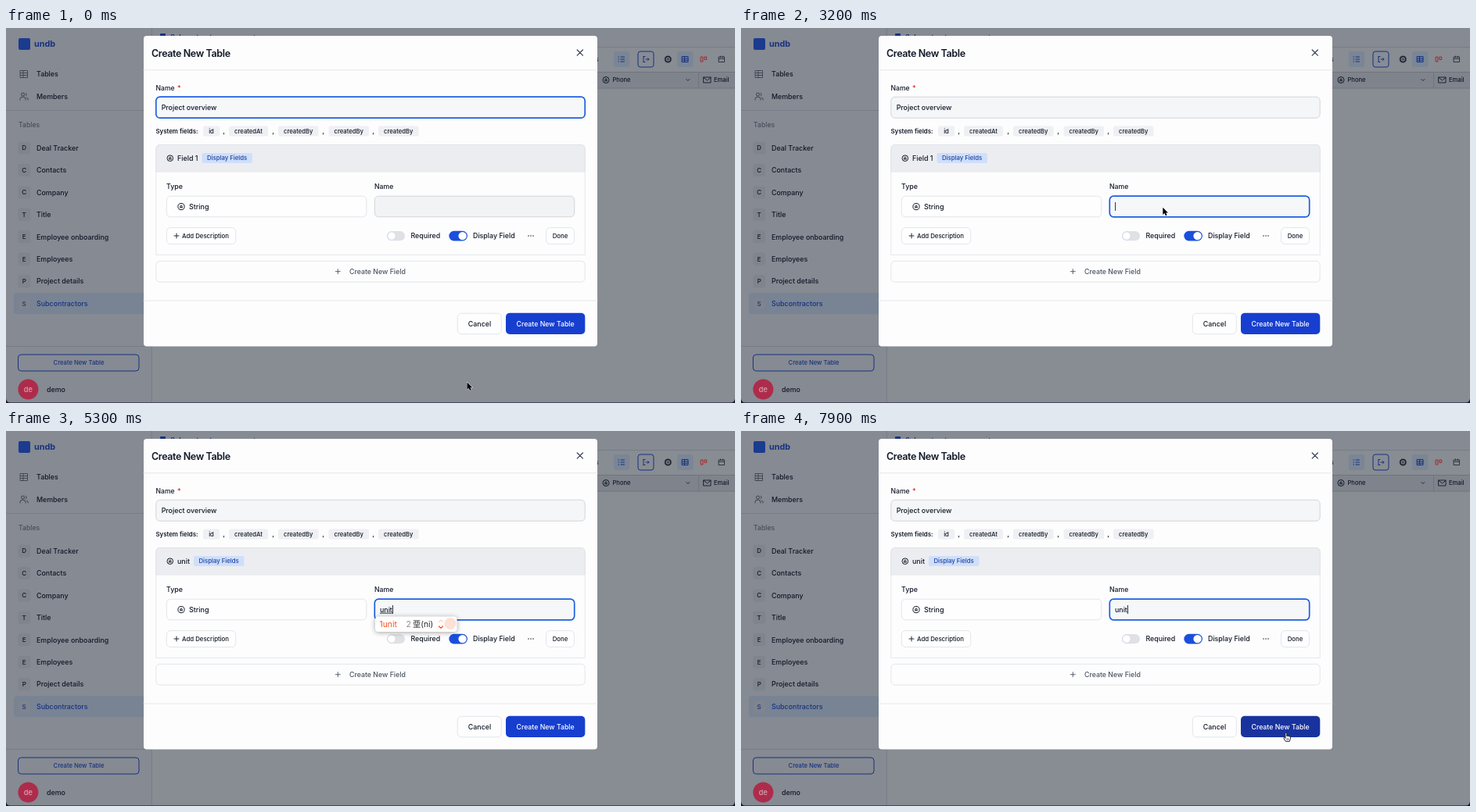
An HTML page for the animation above (8000 ms loop, 932 by 480 pixels).

```html
<!DOCTYPE html>
<html lang="en">
<head>
<meta charset="utf-8">
<title>Create New Table</title>
<style>
  html, body { margin: 0; width: 100%; height: 100%; overflow: hidden; background: #888c93; }
  svg { display: block; font-family: Inter, "Noto Sans CJK SC", "Noto Sans CJK", sans-serif; }
  text { white-space: pre; }
  .popup { filter: drop-shadow(0 1.5px 3px rgba(0, 0, 0, .35)); }
</style>
</head>
<body>
<svg id="stage" width="932" height="480" viewBox="0 0 932 480"></svg>
<script>
const LOOP = 8000;
const INK = '#111827', NAVY = '#173380', BLUE = '#1c5fe0', LINE = '#e3e5ea', ORANGE = '#f4511e';

// Drawing helpers: text is centred vertically on cy.
const text = (x, cy, str, size = 8.85, weight = 500, fill = INK, extra = '') =>
  `<text x="${x}" y="${cy + size * 0.36}" font-size="${size}" font-weight="${weight}" fill="${fill}" ${extra}>${str}</text>`;
const mid = (x, cy, str, size, weight, fill) =>
  text(x, cy, str, size, weight, fill, 'text-anchor="middle"');
const box = (x, y, w, h, r, fill, stroke = 'none', extra = '') =>
  `<rect x="${x}" y="${y}" width="${w}" height="${h}" rx="${r}" fill="${fill}" stroke="${stroke}" ${extra}/>`;
const path = (d, stroke = INK, width = 0.9, fill = 'none', extra = '') =>
  `<path d="${d}" fill="${fill}" stroke="${stroke}" stroke-width="${width}" stroke-linecap="round" stroke-linejoin="round" ${extra}/>`;
const dot = (x, y, r, fill, stroke = 'none', width = 1) =>
  `<circle cx="${x}" cy="${y}" r="${r}" fill="${fill}" stroke="${stroke}" stroke-width="${width}"/>`;
const plus = (x, y, color) => path(`M${x - 3} ${y}h6M${x} ${y - 3}v6`, color);
const letterIcon = (x, y, r = 3.8) =>
  dot(x, y, r, 'none', INK, 1) + path(`M${x - 1.1} ${y + 1.7}v-2.2a1.1 1.1 0 0 1 2.2 0v2.2m-2.2 -1h2.2`, INK, 0.9);

function sidebar() {
  const items = ['Deal Tracker', 'Contacts', 'Company', 'Title', 'Employee onboarding',
    'Employees', 'Project details', 'Subcontractors'];
  const rows = items.map((name, i) => {
    const y = 153.5 + i * 28.45, on = name === 'Subcontractors';
    return (on ? box(10, y - 13.5, 168, 27, 4, '#788394') : '')
      + box(15.5, y - 8, 15.5, 16, 3, '#7f848d')
      + mid(23.2, y, name[0], 8, 500, on ? NAVY : INK)
      + text(39, y, name, 8.9, 500, on ? NAVY : INK);
  }).join('');
  return box(0, 0, 186, 480, 0, '#868a92')
    + path('M186.3 0V480M0 105.5H186M0 407.5H186', '#777c86', 1)
    + box(16, 13, 15, 15, 2, '#1b3b8f') + text(36, 20, 'undb', 10.8, 700, NAVY)
    + path('M18.5 54.5h9v9h-9zM18.5 57.5h9M18.5 60.5h9M22 54.5v9', '#343b4a', 0.8)
    + text(39, 59, 'Tables')
    + dot(21.5, 85, 2, 'none', '#343b4a', 0.9) + path('M18 92v-1.2a3.5 2.6 0 0 1 7 0V92M25 83.2a2 2 0 0 1 0 3.6M26.4 89a2.4 2.4 0 0 1 1.8 3', '#343b4a')
    + text(39, 87.5, 'Members')
    + text(16, 123.5, 'Tables', 8.75, 400, '#3e4554')
    + rows
    + box(15.5, 418, 154.5, 21, 4, 'none', NAVY)
    + mid(93, 428.5, 'Create New Table', 7.65, 500, NAVY)
    + dot(28.4, 462.5, 13, '#ad2c4c') + mid(28.4, 462.5, 'de', 9.2, 500, '#d9a5b3')
    + text(52, 462.5, 'demo');
}

function page() {
  return box(186.8, 0, 746, 24.5, 0, '#868a92')
    + path('M187 24.5H932', '#777c86', 1)
    + box(197, 7, 7, 7, 1, NAVY) + text(210, 11.5, 'Subcontractors', 9, 600, NAVY)
    + path('M317.5 9.5v2', NAVY, 1)
    + box(187, 56.5, 745, 20.5, 0, '#7f838b')
    + path('M187 56.5H932M187 77H932M885.5 56.5V77', '#6f747e', 1)
    + text(753.5, 40, 's', 7.7)
    + box(777, 30, 20, 20, 3, '#7a8595')
    + path('M786 37h4.5M786 40h4.5M786 43h4.5M783 37h.6M783 40h.6M783 43h.6', NAVY, 1)
    + box(808, 30, 20, 20, 3, 'none', NAVY)
    + path('M815 36.5v7M815 36.5h2M815 43.5h2M818 40h4M820.5 38.5l1.5 1.5l-1.5 1.5', NAVY, 1)
    + dot(846.3, 40, 3.3, 'none', INK, 1.2) + dot(846.3, 40, 1.2, 'none', INK, 0.8)
    + dot(846.3, 40, 4.1, 'none', INK, 0.6)
    + box(858, 30, 20.5, 20, 3, '#7a8595')
    + path('M864.5 36.5h7.5v7h-7.5zM864.5 39h7.5M864.5 41.3h7.5M867.5 36.5v7', NAVY, 1)
    + path('M888.5 37h2.4v6h-2.4zM893.3 37h2.4v3.4h-2.4z', '#a02a2c', 1)
    + path('M911.5 37h7v6.5h-7zM911.5 39.3h7M913.5 36v1.5M916.5 36v1.5', '#252c3a', 0.9)
    + letterIcon(767, 66.5, 4) + text(775.5, 66.5, 'Phone', 7.6)
    + path('M869.8 65.5l2 2l2 -2', INK, 0.8)
    + path('M892 63h9v7h-9zM892 63.4l4.5 3.6l4.5 -3.6', INK, 0.9)
    + text(905, 66.5, 'Email', 7.6);
}

function modal() {
  const chips = [[252, 21, 'id'], [285, 50, 'createdAt'], [348, 51.5, 'createdBy'],
    [412.5, 51.5, 'createdBy'], [476, 51.5, 'createdBy']];
  return box(176, 10, 580, 397.5, 4, '#fdfdfe')
    + path('M176 53.8H756M176 349H756', LINE, 0.9)
    + text(186, 32, 'Create New Table', 12.5, 600, INK, 'letter-spacing="-0.38"')
    + path('M730.2 28l7.2 7.2M737.4 28l-7.2 7.2', '#374151', 1.2)
    + text(191.5, 76.5, 'Name', 8.6) + text(219, 76.5, '*', 8.8, 500, '#e02424')
    + box(191.8, 88.2, 548.4, 27, 5, '#f4f6f8', '#cdd1d7', 'id="nameBox"')
    + text(198.7, 101.7, 'Project overview', 8.85)
    + text(191.5, 132, 'System fields:', 7.85, 600)
    + chips.map(([x, w, s]) => box(x, 125.5, w, 13, 2.5, '#eff0f3') + mid(x + w / 2, 132, s, 7.7, 500, INK)).join('')
    + [278.5, 341.5, 405.5, 469.5].map(x => mid(x, 132, ',', 8.8, 500, INK)).join('')
    + path('M191.8 290V154.5a5 5 0 0 1 5 -5H735.2a5 5 0 0 1 5 5V290z', LINE, 0.9, '#fdfdfe')
    + path('M191.8 183.5V154.5a5 5 0 0 1 5 -5H735.2a5 5 0 0 1 5 5V183.5z', '#dfe1e6', 0.9, '#ecedf0')
    + letterIcon(209.8, 166.7)
    + text(219, 166.5, '', 8.9, 500, INK, 'id="title"')
    + `<g id="badge">${box(0, 160, 64.5, 13, 2.5, '#cfdffb')}${mid(32.2, 166.5, 'Display Fields', 7.75, 500, '#1e429f')}</g>`
    + text(205, 203.3, 'Type') + text(471, 203.3, 'Name', 8.7)
    + box(205.3, 215.2, 255.5, 26.6, 5, '#fefefe', LINE)
    + letterIcon(224, 228.6, 4.1) + text(234, 228.5, 'String', 8.95)
    + box(471.3, 215.2, 255.4, 26.6, 5, '#f1f3f5', '#cdd1d7', 'id="fieldBox"')
    + text(478, 228.5, '', 8.85, 500, INK, 'id="field"')
    + box(205.3, 255.6, 88.4, 21, 5, '#fefefe', LINE) + plus(218, 266, INK)
    + text(225, 266, 'Add Description', 7.8)
    + box(487, 260, 23, 12.3, 6.1, '#dfe1e5') + dot(493, 266.1, 5.2, '#fff', '#cfd3d9', 0.7)
    + text(517.5, 266, 'Required')
    + box(566.3, 259.8, 23.7, 12.6, 6.3, '#1a4fdc') + dot(583.6, 266.1, 5.2, '#fff')
    + text(597, 266, 'Display Field')
    + [668, 671, 674].map(x => dot(x, 266, 0.75, INK)).join('')
    + box(690.5, 255.6, 36, 21, 5, '#fefefe', LINE) + mid(708.5, 266, 'Done', 7.8, 500, INK)
    + box(191.8, 298.3, 548.4, 26.8, 5, '#fdfdfe', LINE) + plus(424.3, 311.7, '#4b5563')
    + text(439, 311.7, 'Create New Field', 8.8, 500, '#4b5563')
    + box(577.3, 365.2, 56, 26.6, 5, '#fefefe', LINE) + mid(605.5, 378.5, 'Cancel', 8.85, 500, INK)
    + box(639, 364.8, 101.3, 27.2, 5, '#173fcf', 'none', 'id="submit"')
    + mid(689.6, 378.5, 'Create New Table', 8.75, 500, '#fff')
    + box(0, 0, 0.9, 11, 0, INK, 'none', 'id="caret"');
}

function popups() {
  const cjk = (x, y, s, fill = '#222') => text(x, y, s, 7.8, 400, fill);
  const hint = box(468, 237, 247.5, 52, 3, '#fff') + dot(706.5, 246.5, 8, '#fde0d6')
    + cjk(474.3, 246.3, '请输入笔画h（一）、s（丨）、p（丿）、n（丶）、z（乛）')
    + cjk(474.3, 260, "例：u'hspn=木，或输入拼音组合字，例：u'nv'zi = 好")
    + cjk(474.3, 277.3, '你也可以尝试') + cjk(524.7, 277.3, '手写输入', ORANGE);
  const list = box(472, 237.5, 104.5, 19.5, 4, '#fff') + dot(568, 246.5, 7.5, '#fde0d6')
    + text(477.5, 247.5, '', 10.4, 400, ORANGE, 'id="pick"')
    + text(511.5, 247.5, '2', 10.4, 400, '#8b8b8b')
    + text(520, 247.5, '', 10.2, 400, '#222', 'id="other"')
    + path('M553.5 244.3l2.5 -2.3l2.5 2.3', '#f7b9a5', 1) + path('M553.5 250l2.5 2.3l2.5 -2.3', ORANGE, 1.2);
  return `<g id="hint" class="popup">${hint}</g><g id="list" class="popup">${list}</g>`;
}

function pointers() {
  const arrow = path('M0 0V9.2L2.1 7.3L3.6 10.6L5.3 9.8L3.9 6.7H6.7Z', '#fff', 0.8, '#000', 'paint-order="stroke"');
  const hand = path('M-1.2 1a1 1 0 0 1 2 0V4.3a.9 .9 0 0 1 1.7 .2a.9 .9 0 0 1 1.6 .4a.8 .8 0 0 1 1.3 .7V7.6L4.2 11H-.6L-3.2 7.2a.9 .9 0 0 1 1.2 -1.1l.8 .7Z', '#111', 0.9, '#fff')
    + path('M1 7.2v2M2.7 7.2v2', '#111', 0.6);
  return `<g id="arrow">${arrow}</g><g id="hand">${hand}</g>`;
}

const frame = path('M0 479.5H932', '#45465c', 1)
  + path('M0 474V480H6A6 6 0 0 1 0 474ZM932 474V480H926A6 6 0 0 0 932 474Z', 'none', 0, '#17172b');

document.getElementById('stage').innerHTML =
  box(0, 0, 932, 480, 0, '#888c93') + page() + sidebar() + frame + modal() + popups() + pointers();

const el = {};
document.querySelectorAll('[id]').forEach(n => { el[n.id] = n; });

// Start time, typed text, input method window, its second candidate.
const steps = [
  { at: -800, focus: 'name', typed: '' },
  { at: 2000, focus: 'field', typed: '' },
  { at: 3650, focus: 'field', typed: 'u', ime: 'hint' },
  { at: 4600, focus: 'field', typed: 'un', ime: 'list', other: '丶(n)' },
  { at: 4800, focus: 'field', typed: 'uni', ime: 'list', other: '垔(ni)' },
  { at: 5000, focus: 'field', typed: 'unit', ime: 'list', other: '垔(ni)' },
  { at: 5700, focus: 'field', typed: 'unit' },
];
const moves = [
  { from: 100, to: 700, a: [589.5, 453.5], b: [539.3, 229.7] },
  { from: 6600, to: 7300, a: [539.3, 229.7], b: [697, 386.3] },
];

const clamp = v => Math.min(1, Math.max(0, v));
const ease = p => p * p * (3 - 2 * p);
const show = (node, on) => node.setAttribute('visibility', on ? 'visible' : 'hidden');
const put = (node, x, y) => node.setAttribute('transform', `translate(${x} ${y})`);

function focusBox(node, on, idle) {
  node.setAttribute('stroke', on ? BLUE : '#cdd1d7');
  node.setAttribute('stroke-width', on ? 1.7 : 0.9);
  node.setAttribute('fill', on ? '#f5f7f9' : idle);
}

function render(t) {
  const step = steps.filter(s => s.at <= t).pop();
  const inName = step.focus === 'name';
  focusBox(el.nameBox, inName, '#f4f6f8');
  focusBox(el.fieldBox, !inName, '#f1f3f5');

  el.title.textContent = step.typed || 'Field 1';
  put(el.badge, 219 + el.title.getComputedTextLength() + 5, 0);
  el.field.textContent = step.typed;
  el.field.setAttribute('text-decoration', step.ime ? 'underline' : 'none');

  const fieldEnd = step.typed ? 478.2 + el.field.getComputedTextLength() : 478.2;
  put(el.caret, inName ? 269.8 : fieldEnd, inName ? 96 : 223);
  show(el.caret, (t - step.at) % 1000 < 500);

  show(el.hint, step.ime === 'hint');
  show(el.list, step.ime === 'list');
  el.pick.textContent = '1' + step.typed;
  el.other.textContent = step.other || '';

  const m = t < moves[1].from ? moves[0] : moves[1];
  const p = ease(clamp((t - m.from) / (m.to - m.from)));
  const [x, y] = m.a.map((v, i) => v + (m.b[i] - v) * p);
  const seen = t < 3650 || t >= moves[1].from;
  const over = m === moves[1] && y > 365;
  put(el.arrow, x, y);
  put(el.hand, x, y);
  show(el.arrow, seen && !over);
  show(el.hand, seen && over);

  const h = m === moves[1] ? clamp((y - 365) / 15) : 0;
  const shade = [[23, 25], [63, 51], [207, 158]].map(([a, b]) => Math.round(a + (b - a) * h));
  el.submit.setAttribute('fill', `rgb(${shade})`);
}

const start = performance.now();
function tick() {
  render((performance.now() - start) % LOOP);
  requestAnimationFrame(tick);
}
tick();
</script>
</body>
</html>
```
